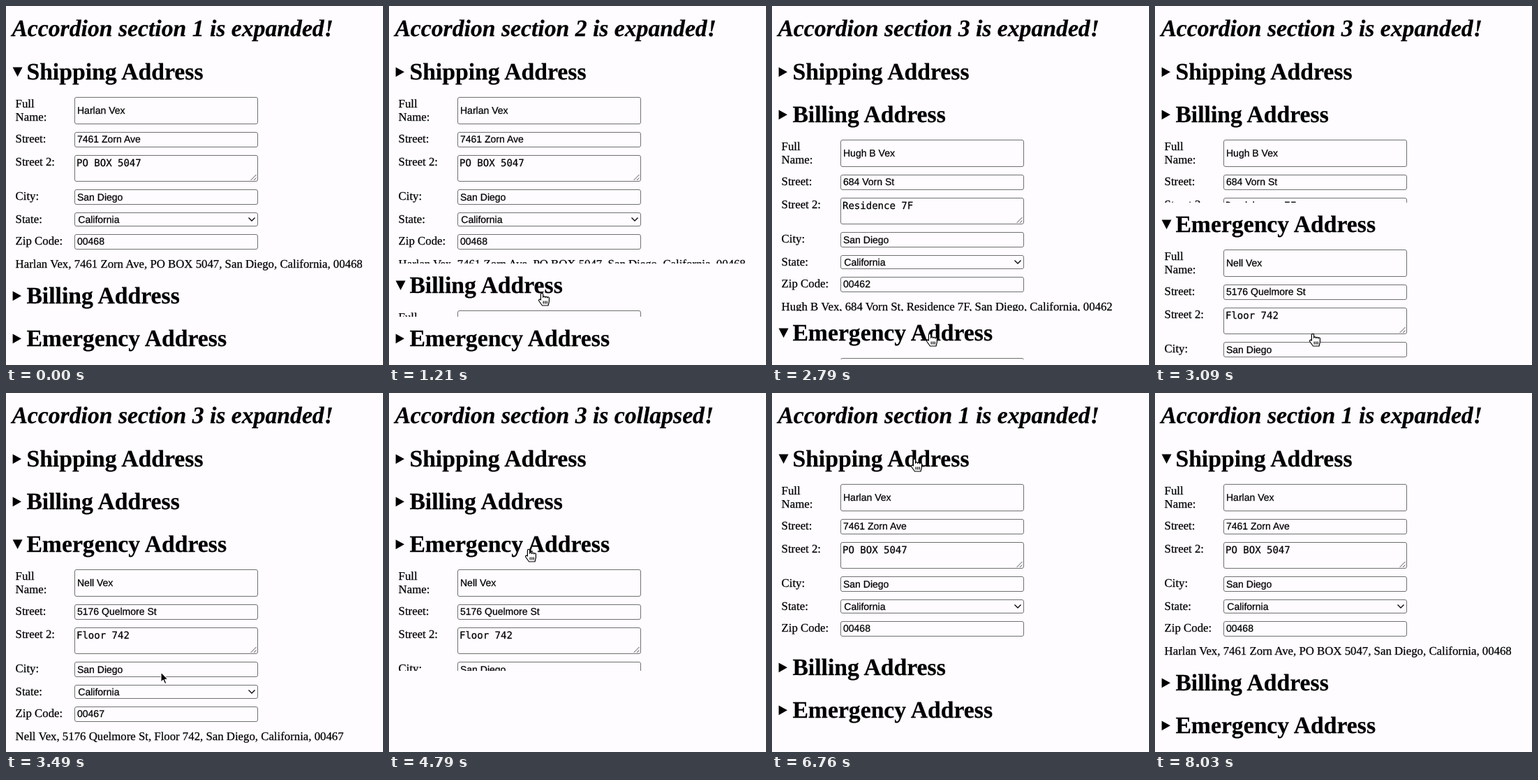
An HTML page with a canvas for the animation above (8150 ms loop, 540 by 513 pixels).

```html
<!DOCTYPE html>
<html lang="en">
<head>
<meta charset="utf-8">
<title>Accordion</title>
<style>
  html, body { margin: 0; width: 100%; height: 100%; overflow: hidden; background: #fefcff; }
  canvas { display: block; }
</style>
</head>
<body>
<canvas width="540" height="513"></canvas>
<script>
const ctx = document.querySelector('canvas').getContext('2d');
const LOOP = 8150, PANEL = 259, SLIDE = 500, STEP = 30;
const SERIF = '"Liberation Serif", serif';
const FONT = {
  title: 'italic bold 33.7px ' + SERIF,
  heading: 'bold 33.7px ' + SERIF,
  label: '16.8px ' + SERIF,
  input: '14px "Liberation Sans", sans-serif',
  area: '14px "DejaVu Sans Mono", monospace'
};

const sections = [
  { name: 'Shipping Address', values: ['Harlan Vex', '7461 Zorn Ave', 'PO BOX 5047', 'San Diego', 'California', '00468'] },
  { name: 'Billing Address', values: ['Hugh B Vex', '684 Vorn St', 'Residence 7F', 'San Diego', 'California', '00462'] },
  { name: 'Emergency Address', values: ['Nell Vex', '5176 Quelmore St', 'Floor 742', 'San Diego', 'California', '00467'] }
];

// Offsets from the panel top: box top, box height, label baseline, text baseline
const rows = [
  { label: 'Full', top: 6, height: 38, labelY: 21, textY: 30 },
  { label: 'Street:', top: 56, height: 21, labelY: 71, textY: 71 },
  { label: 'Street 2:', top: 89, height: 37, labelY: 104, textY: 105, kind: 'area' },
  { label: 'City:', top: 138, height: 21, labelY: 153, textY: 154 },
  { label: 'State:', top: 171, height: 19, labelY: 186, textY: 186, kind: 'select' },
  { label: 'Zip Code:', top: 202, height: 21, labelY: 217, textY: 217 }
];

// Clicks: time, lead of the slide, section opened, section closed
const clicks = [
  { at: 1210, lead: 29, open: 1, close: 0 },
  { at: 2790, lead: 15, open: 2, close: 1 },
  { at: 4610, lead: 28, close: 2 },
  { at: 6310, lead: 8, open: 0 }
];

// Pointer moves: start, end, target x and y, sideways bulge
const moves = [
  [30, 760, 219, 411, 0],
  [1940, 2490, 226, 469, 22],
  [3430, 3610, 214, 262, 0],
  [3880, 4150, 200, 224, 0],
  [5430, 6000, 204, 95, 0],
  [6850, 7030, 235, -20, 0]
];

const arrow = new Path2D('M0 0V14.5L3.3 11.4 5.6 16.8 8 15.8 5.7 10.5H10.2Z');
const hand = new Path2D('M-1.6 9V1a1.6 1.6 0 0 1 3.2 0V5.3a1.5 1.5 0 0 1 3 .3a1.5 1.5 0 0 1 3 .4' +
  'a1.4 1.4 0 0 1 2.8 .8V11L9 17H.5L-4.2 10.5a1.4 1.4 0 0 1 2.3-1.7Z');
const knuckles = new Path2D('M2.2 10.5v4M4.7 10.5v4M7.2 10.5v4');

// A hairline stroke gives the slightly heavy text smoothing
function text(str, x, y, font) {
  ctx.font = FONT[font];
  ctx.fillStyle = ctx.strokeStyle = '#000';
  ctx.lineWidth = 0.25;
  ctx.fillText(str, x, y);
  ctx.strokeText(str, x, y);
}

function line(points, color, width) {
  ctx.beginPath();
  points.forEach(([x, y]) => ctx.lineTo(x, y));
  ctx.strokeStyle = color;
  ctx.lineWidth = width;
  ctx.stroke();
}

function layout(t) {
  const state = { title: 'section 1 is expanded', open: 0, heights: [PANEL, 0, 0] };
  for (const { at, lead, open, close } of clicks) {
    if (t < at) break;
    const elapsed = Math.floor((t - at) / STEP) * STEP + lead;
    const grown = Math.round(PANEL * Math.min(1, elapsed / SLIDE));
    if (open !== undefined) state.heights[open] = grown;
    if (close !== undefined) state.heights[close] = PANEL - grown;
    state.open = open;
    state.title = open === undefined ? `section ${close + 1} is collapsed` : `section ${open + 1} is expanded`;
  }
  let y = 94;
  state.centers = state.heights.map(h => {
    const center = y;
    y += h + 61;
    return center;
  });
  return state;
}

function drawField(row, value, top) {
  const y = top + row.top;
  text(row.label, 13.6, top + row.labelY, 'label');
  ctx.beginPath();
  ctx.roundRect(98.5, y + 0.5, 262, row.height, 2.5);
  ctx.fillStyle = '#fefcff';
  ctx.fill();
  ctx.strokeStyle = '#707070';
  ctx.lineWidth = 1;
  ctx.stroke();
  const x = { area: 101, select: 103.3 }[row.kind] || 102;
  text(value, x, top + row.textY, row.kind === 'area' ? 'area' : 'input');
  if (row.kind === 'select') line([[347.5, y + 7.5], [352, y + 12], [356.5, y + 7.5]], '#000', 1.3);
  if (row.kind === 'area') {
    const bottom = y + row.height - 1;
    line([[350.5, bottom], [358.5, bottom - 8]], '#555', 1);
    line([[355, bottom], [358.5, bottom - 3.5]], '#555', 1);
  }
}

function drawPanel(values, top, height) {
  if (height <= 0) return;
  ctx.save();
  ctx.beginPath();
  ctx.rect(0, top, 540, height);
  ctx.clip();
  rows.forEach((row, i) => drawField(row, values[i], top));
  text('Name:', 13.6, top + 40, 'label');
  text(values.join(', '), 13.6, top + 250, 'label');
  ctx.restore();
}

function drawMarker(y, open) {
  ctx.beginPath();
  const points = open ? [[9.6, -6.6], [23.6, -6.6], [16.6, 7]] : [[9.6, -6.6], [22, 0.3], [9.6, 7.2]];
  points.forEach(([x, dy]) => ctx.lineTo(x, y + dy));
  ctx.fillStyle = '#000';
  ctx.fill();
}

function drawPointer(t) {
  if (t < 30 || t >= 7030) return;
  let x = 540, y = 478, settled = 0;
  for (const [start, end, toX, toY, bulge] of moves) {
    if (t < start) break;
    const p = Math.min(1, (t - start) / (end - start));
    x += (toX - x) * p + bulge * Math.sin(Math.PI * p);
    y += (toY - y) * p;
    settled = Math.min(t, end);
  }
  // The shape only updates while the pointer moves
  const isHand = layout(settled).centers.some(c => Math.abs(y - c) < 19.5);
  ctx.save();
  ctx.translate(x, y);
  ctx.lineJoin = 'round';
  ctx.lineWidth = 1.2;
  ctx.fillStyle = isHand ? '#fff' : '#000';
  ctx.strokeStyle = isHand ? '#000' : '#fff';
  ctx.fill(isHand ? hand : arrow);
  ctx.stroke(isHand ? hand : arrow);
  if (isHand) ctx.stroke(knuckles);
  ctx.restore();
}

function draw(t) {
  const { title, open, heights, centers } = layout(t);
  ctx.fillStyle = '#fefcff';
  ctx.fillRect(0, 0, 540, 513);
  text(`Accordion ${title}!`, 8.4, 43, 'title');
  sections.forEach(({ name, values }, i) => {
    drawMarker(centers[i], open === i);
    text(name, 29.4, centers[i] + 11, 'heading');
    drawPanel(values, centers[i] + 30, heights[i]);
  });
  drawPointer(t);
}

ctx.textRendering = 'geometricPrecision';
ctx.lineJoin = 'round';
const begin = performance.now();
function frame() {
  draw((performance.now() - begin) % LOOP);
  requestAnimationFrame(frame);
}
frame();
</script>
</body>
</html>
```
